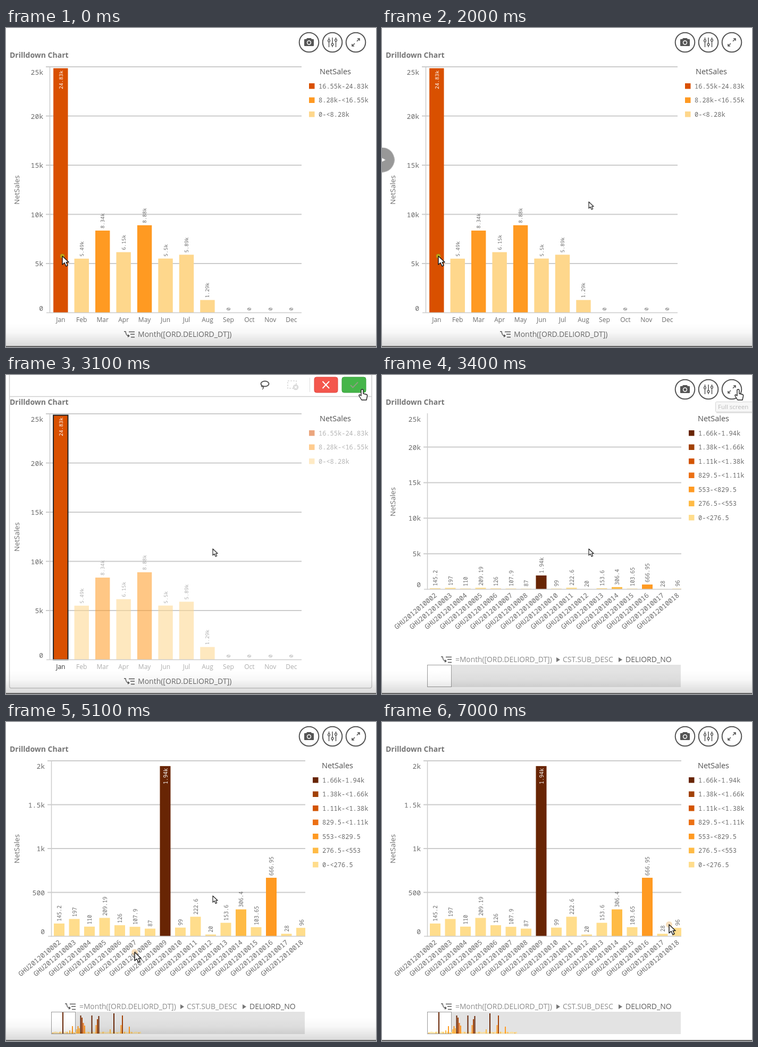
Recreate the animation shown at these times as an HTML page. Size 696 px wide and 600 px high, loop 7.1 s.

```html
<!DOCTYPE html>
<html lang="en">
<head>
<meta charset="utf-8">
<title>Drilldown chart</title>
<style>
html, body { margin: 0; width: 100%; height: 100%; overflow: hidden; background: #fff; }
svg { display: block; width: 696px; height: 600px; }
text { font-family: "Open Sans", "Noto Sans", sans-serif; fill: #6b6b6b; }
.mono { font-family: "Noto Sans Mono", "DejaVu Sans Mono", monospace; }
.title { font-weight: bold; font-size: 14px; fill: #757575; }
.line { fill: none; stroke: #555; stroke-width: 2; }
</style>
</head>
<body>
<svg id="stage" viewBox="0 0 696 600">
  <defs>
    <linearGradient id="shade" x1="0" y1="0" x2="0" y2="1">
      <stop offset="0" stop-color="#000" stop-opacity="0"/>
      <stop offset=".4" stop-color="#000" stop-opacity=".03"/>
      <stop offset="1" stop-color="#000" stop-opacity=".15"/>
    </linearGradient>
    <clipPath id="plot"><rect x="85" y="40" width="478" height="364"/></clipPath>
    <g id="drill">
      <path d="M0 1H3Q4 9 8 9M9 1.500H20M12 6H20M13 11.500H20" fill="none" stroke="#555" stroke-width="1.4"/>
      <path d="M7 6L11 9L7 12Z" fill="#555"/>
    </g>
    <path id="arrow" d="M0 0V16L4 12.5L7 19L10 17.5L7.2 11.5H12Z" fill="#fff" stroke="#1c1c1c" stroke-width="1.5" stroke-linejoin="round"/>
  </defs>
  <rect width="696" height="600" fill="#fff"/>
  <text class="title" x="7" y="56">Drilldown Chart</text>

  <g id="tools" class="line">
    <circle cx="570" cy="27" r="18.3"/><circle cx="614" cy="27" r="18.3"/><circle cx="658" cy="27" r="18.3"/>
    <path d="M562 22H565L567 20H573L575 22H578V33H562Z" fill="#555" stroke-linejoin="round"/>
    <circle cx="570" cy="27.5" r="3.4" stroke="#fff" stroke-width="1.5"/>
    <path d="M607.500 18V36M614 18V36M620.500 18V36" stroke-width="1.5"/>
    <g fill="#fff" stroke-width="1.3"><circle cx="607.5" cy="24" r="2"/><circle cx="614" cy="31" r="2"/><circle cx="620.5" cy="23" r="2"/></g>
    <path d="M660 25L665 20M661 20H665V24M656 29L651 34M655 34H651V30" stroke-width="1.6"/>
  </g>

  <g id="confirm">
    <path d="M6.500 0V585Q6.500 589 10 589H684Q688 589 688 585V0M6 40.500H688" fill="none" stroke="#cfcfcf" stroke-width="1.5"/>
    <path d="M571.500 5V32" stroke="#ddd"/>
    <g class="line"><ellipse cx="487" cy="16.500" rx="7.500" ry="5"/><path d="M481 19Q479 23 484 22Q485 25 482 27" stroke-width="1.500"/></g>
    <g fill="none" stroke="#d9d9d9" stroke-width="1.500"><rect x="530" y="11" width="16" height="14" stroke-dasharray="3 2"/><circle cx="545" cy="23" r="4.500" fill="#ddd"/><path d="M543 21L547 25M547 21L543 25" stroke="#fff"/></g>
    <rect x="580" y="4" width="44" height="29" rx="4" fill="#f4564d" stroke="#df4a42"/>
    <path d="M595.500 12L608 25M608 12L595.500 25" stroke="#fff" stroke-width="2"/>
    <rect x="632" y="4" width="45" height="29" rx="4" fill="#45b549" stroke="#3aa03e"/>
    <path d="M648 19L652.500 23.500L662 13.500" fill="none" stroke="#8b9f7f" stroke-width="2"/>
  </g>

  <g id="months"></g>
  <g id="orders"></g>

  <g id="tip">
    <rect x="629" y="52" width="72" height="20" fill="#999" opacity=".5"/>
    <rect x="627.500" y="50.500" width="72" height="19" rx="2" fill="#f0f0f0" stroke="#aaa"/>
    <text x="632" y="64" font-size="11.500" style="fill:#777">Full screen</text>
  </g>

  <rect id="fade" y="556" width="696" height="43" fill="url(#shade)"/>
  <rect y="598" width="696" height="2" fill="#626262"/>

  <g id="preview">
    <rect x="222.500" y="524.500" width="129" height="76" fill="#fff" fill-opacity=".65" stroke="#555"/>
    <path d="M222 525H352" stroke="#7a3028" stroke-width="2"/>
    <rect x="224" y="527" width="126" height="6" fill="#e8d9a8" opacity=".6"/>
    <rect x="329" y="534" width="22" height="17" fill="#777" opacity=".75"/>
    <path d="M253 546V574M258 550V574M262 543V574M267 550V574M272 546V574M277 552V574M283 547V574M289 554V574M308 544V574" stroke="#bbb"/>
    <path d="M295.500 543V582M299 570V582M303 566V582" stroke="#555" stroke-width="1.500"/>
    <path d="M224 591H350M224 596H350" stroke="#999" stroke-dasharray="12 4"/>
    <rect x="268" y="580" width="37" height="18" rx="2" fill="#555"/>
    <text x="286.500" y="593" font-size="12" font-weight="bold" text-anchor="middle" style="fill:#fff">8:46</text>
  </g>

  <g id="play">
    <circle r="39" fill="#000" opacity=".45"/><path d="M-10 -11L11 0L-10 11Z" fill="#fff"/>
  </g>
  <g id="cursor">
    <circle id="halo"/>
    <use id="pointer" href="#arrow"/>
    <path id="hand" d="M-1 1Q1 -1 3 1V8L9 9.500Q11 10 10.500 13L9 20H0L-5 12Q-5 9 -2 11L-1 12Z" fill="#fff" stroke="#222" stroke-width="1.400" stroke-linejoin="round"/>
  </g>
  <use id="mouse" href="#arrow"/>
</svg>
<script>
const NS = "http://www.w3.org/2000/svg";
const $ = id => document.getElementById(id);
const set = (el, attrs) => { for (const k in attrs) el.setAttribute(k, attrs[k]); return el; };
const show = (id, opacity) => set($(id), { opacity: +opacity });

function add(parent, tag, attrs) {
  return parent.appendChild(set(document.createElementNS(NS, tag), attrs));
}
function label(parent, x, y, text, size, { anchor = "start", rot = 0, mono = true, fill = "#6b6b6b" } = {}) {
  const el = add(parent, "text", {
    "font-size": size, "text-anchor": anchor, class: mono ? "mono" : "",
    transform: `translate(${x} ${y}) rotate(${rot})`, style: `fill:${fill}`
  });
  el.textContent = text;
  return el;
}
const line = (g, x1, y1, x2, y2, color = "#ccc", w = 2) =>
  add(g, "path", { d: `M${x1} ${y1}L${x2} ${y2}`, stroke: color, "stroke-width": w });

// Value axis: returns a function that places the ticks for a stretch factor
function axis(g, left, right, bottom, labels) {
  const step = (bottom - 73) / (labels.length - 1);
  const ticks = labels.map((s, i) => ({
    rule: line(g, left - 7, 0, right, 0, i ? "#ccc" : "none"),
    name: label(g, 0, 0, s, 13, { anchor: "end" })
  }));
  const place = stretch => ticks.forEach(({ rule, name }, i) => {
    const y = bottom - i * step * stretch;
    const textY = i ? Math.max(88, y + 5) : y - 4;
    set(rule, { transform: `translate(0 ${y})`, opacity: +(y > 72) });
    set(name, { transform: `translate(${left - 12} ${textY})`, opacity: +(y > 66) });
  });
  place(1);
  return place;
}
function legend(g, x, titleX, colors, names) {
  label(g, titleX, 87, "NetSales", 14.5, { mono: false, fill: "#505050" });
  const items = add(g, "g", {});
  names.forEach((s, i) => {
    const y = 109 + i * 26.5;
    add(items, "rect", { x, y: y - 5, width: 10.5, height: 10.5, fill: colors[i] });
    label(items, x + 18, y + 4.5, s, 12);
  });
  return items;
}

// First level: months
const months = $("months");
const warm = ["#d95000", "#ff9a22", "#fed78c"];
axis(months, 82, 556, 535.5, ["0", "5k", "10k", "15k", "20k", "25k"]);
label(months, 25, 332, "NetSales", 13.5, { rot: -90, mono: false });
const monthLegend = legend(months, 570, 590, warm, ["16.55k-24.83k", "8.28k-<16.55k", "0-<8.28k"]);
const sales = [24.83, 5.49, 8.34, 6.15, 8.88, 5.5, 5.89, 1.29, 0, 0, 0, 0];
const others = add(months, "g", {});
let janBar, janName;
"Jan Feb Mar Apr May Jun Jul Aug Sep Oct Nov Dec".split(" ").forEach((name, i) => {
  const v = sales[i], cx = 102.8 + i * 39.45, y = 535.5 - v * 18.52;
  const g = i ? others : months;
  const bar = add(g, "rect", {
    x: cx - 13.7, y, width: 27.4, height: 535.5 - y,
    fill: warm[v > 16.55 ? 0 : v > 8.28 ? 1 : 2]
  });
  const month = label(g, cx, 552.5, name, 12, { anchor: "middle", mono: false });
  if (i) label(g, cx + 3.5, y - 4, v ? v + "k" : "0", 9.5, { rot: -90 });
  else {
    janBar = bar; janName = month;
    label(g, cx + 4, 80, v + "k", 9.7, { anchor: "end", rot: -90, fill: "#fff" });
  }
});
line(months, 82.5, 72, 82.5, 536, "#ccc", 1.5);
line(months, 76, 535.5, 556, 535.5, "#ccc", 1.5);
add(months, "use", { href: "#drill", x: 222, y: 570 });
label(months, 248, 581, "Month([ORD.DELIORD_DT])", 14, { mono: false });

// Last level: orders
const orders = $("orders");
const heat = ["#ffdd8c", "#ffbb45", "#ff9a22", "#ec7014", "#d35400", "#a24107", "#682504"];
const wide = add(orders, "g", {}), tight = add(orders, "g", {});
const placeWide = axis(wide, 85, 563, 403, ["0", "5k", "10k", "15k", "20k", "25k"]);
const placeTight = axis(tight, 85, 563, 403, ["0", "500", "1k", "1.5k", "2k"]);
label(orders, 25, 266, "NetSales", 13.5, { rot: -90, mono: false });
legend(orders, 577, 594, [...heat].reverse(), ["1.66k-1.94k", "1.38k-<1.66k", "1.11k-<1.38k",
  "829.5-<1.11k", "553-<829.5", "276.5-<553", "0-<276.5"]);
const amounts = [145.2, 197, 110, 209.19, 126, 107.9, 87, 1940, 99, 222.6, 20, 153.6, 306.4, 103.65, 666.95, 28, 96];
const plot = add(orders, "g", { "clip-path": "url(#plot)" });
const bars = amounts.map((v, i) => {
  const cx = 100 + i * 28.5;
  const bar = add(plot, "rect", { x: cx - 10, width: 20, fill: heat[Math.min(6, Math.floor(v / 276.5))] });
  const tag = label(plot, 0, 0, v > 1000 ? v / 1000 + "k" : v, 10);
  label(orders, cx + 4, 416, "GHU20120100" + String(i + 2).padStart(2, "0"), 12.7, { anchor: "end", rot: -39.5 });
  return { v, cx, bar, tag };
});
line(orders, 85.5, 72, 85.5, 404, "#ccc", 1.5);
line(orders, 79, 403, 563, 403, "#ccc", 1.5);
add(orders, "use", { href: "#drill", x: 111, y: 529 });
label(orders, 138, 540, "=Month([ORD.DELIORD_DT])", 13.8, { mono: false, fill: "#8c8c8c" });
label(orders, 340, 540, "CST.SUB_DESC", 14, { mono: false, fill: "#8c8c8c" });
label(orders, 458, 540, "DELIORD_NO", 14, { mono: false, fill: "#5c5c5c" });
add(orders, "path", { d: "M328 531L335 535.500L328 540ZM445 531L452 535.500L445 540Z", fill: "#777" });

// Overview strip
add(orders, "rect", { x: 85, y: 545, width: 477, height: 42, fill: "#e3e3e3" });
add(orders, "rect", { x: 85.5, y: 545.5, width: 45, height: 41, fill: "#fff", stroke: "#999" });
const strip = add(orders, "g", {});
const tick = (x, h, c) => add(strip, "rect", { x, y: 586 - h, width: 2, height: h, fill: heat[c] });
for (let i = 0; i < 62; i++) tick(87 + i * 2.7, 2 + 1.5 * Math.abs(Math.sin(i * 2.3)), i % 5 ? 0 : 1);
[[106, 40, 6], [119, 6, 1], [124, 14, 2], [132, 8, 1], [134.5, 14, 2], [137, 10, 1], [139.5, 34, 6],
 [142, 30, 5], [144.5, 20, 3], [147, 15, 2], [160.5, 34, 6], [168.5, 16, 2], [171, 27, 5], [173.5, 33, 6],
 [195, 8, 1], [202, 38, 6], [215.5, 16, 2], [218, 34, 5], [231, 13, 2]].forEach(a => tick(...a));

// zoom 1 shows 0 to 25k, zoom 12.5 shows 0 to 2k
function zoomOrders(zoom) {
  placeWide(zoom);
  placeTight(zoom / 12.5);
  for (const { v, cx, bar, tag } of bars) {
    const h = 330 * v * zoom / 25000, y = 403 - h, inside = h > 280;
    set(bar, { y, height: h });
    set(tag, {
      transform: `translate(${cx + 4} ${inside ? y + 4 : y - 4}) rotate(-90)`,
      "text-anchor": inside ? "end" : "start", style: `fill:${inside ? "#fff" : "#6b6b6b"}`
    });
  }
}

// Interpolates [time, ...values] keys with eased segments
function at(keys, t) {
  const n = keys.findIndex(k => k[0] > t);
  if (n < 0) return keys[keys.length - 1].slice(1);
  if (!n) return keys[0].slice(1);
  const a = keys[n - 1], b = keys[n];
  const u = (t - a[0]) / (b[0] - a[0]), e = u * u * (3 - 2 * u);
  return a.slice(1).map((v, i) => v + (b[i + 1] - v) * e);
}
const within = (t, a, b) => t >= a && t < b;

const path = [[0, 106, 429], [2000, 106, 429], [2200, 103, 420], [2500, 103, 420], [3100, 669, 27],
  [3600, 669, 27], [4200, 158, 391], [4500, 158, 391],
  [5600, 306, 465], [5900, 306, 465], [7000, 540, 381]];

function halo(t) {
  if (within(t, 2200, 2500)) return { r: 6.5, fill: "#b83a00", stroke: "#8e2500", opacity: .65 };
  if (within(t, 4200, 4500)) return { r: 6, fill: "#a8853a", stroke: "#e8a838", opacity: .75 };
  if (t < 2200 || within(t, 5600, 6000)) return { r: 4, fill: "#c3c61c", stroke: "#90a020", opacity: .75 };
  return { r: 6, fill: "#f0c890", stroke: "none", opacity: .6 };
}

function draw(t) {
  const picked = within(t, 2200, 3300), drilled = t >= 3300;
  show("tools", !picked);
  show("confirm", picked);
  show("months", !drilled);
  show("orders", drilled);
  set(others, { opacity: picked ? .55 : 1 });
  set(monthLegend, { opacity: picked ? .5 : 1 });
  set(janBar, { stroke: picked ? "#222" : "none", "stroke-width": 2 });
  janName.style.fill = picked ? "#333" : "#6b6b6b";

  zoomOrders(at([[3390, 1], [3900, 12.5]], t)[0]);
  set(wide, { opacity: at([[3400, 1], [3600, 0]], t)[0] });
  set(tight, { opacity: at([[3400, 0], [3700, 1]], t)[0] });
  set(strip, { opacity: +(t >= 3500) });
  show("tip", at([[3300, 0], [3500, 1], [3600, 1], [3800, 0]], t)[0]);

  show("preview", at([[800, 0], [1000, .8], [1200, .8], [1500, 0]], t)[0]);
  show("fade", at([[5200, 1], [5600, 0]], t)[0]);
  const [size, alpha] = at([[2000, .6, .9], [2400, 1, .27], [2600, 1.2, 0]], t);
  set($("play"), { transform: `translate(0 248) scale(${size})`, opacity: t < 2000 ? 0 : alpha });

  const [x, y] = at(path, t), over = within(t, 3000, 3700);
  set($("cursor"), { transform: `translate(${x} ${y})` });
  set($("halo"), halo(t));
  if (over) show("halo", 0);
  show("pointer", !over);
  show("hand", over);
  set($("mouse"), {
    transform: `translate(${t < 1800 ? "369 310" : "389 327"}) scale(.76)`,
    opacity: +within(t, 1700, 5300)
  });
}

const start = performance.now();
function loop() {
  const t = (performance.now() - start) % 7100;
  draw(Math.floor(t / 100) * 100);
  requestAnimationFrame(loop);
}
loop();
</script>
</body>
</html>
```
